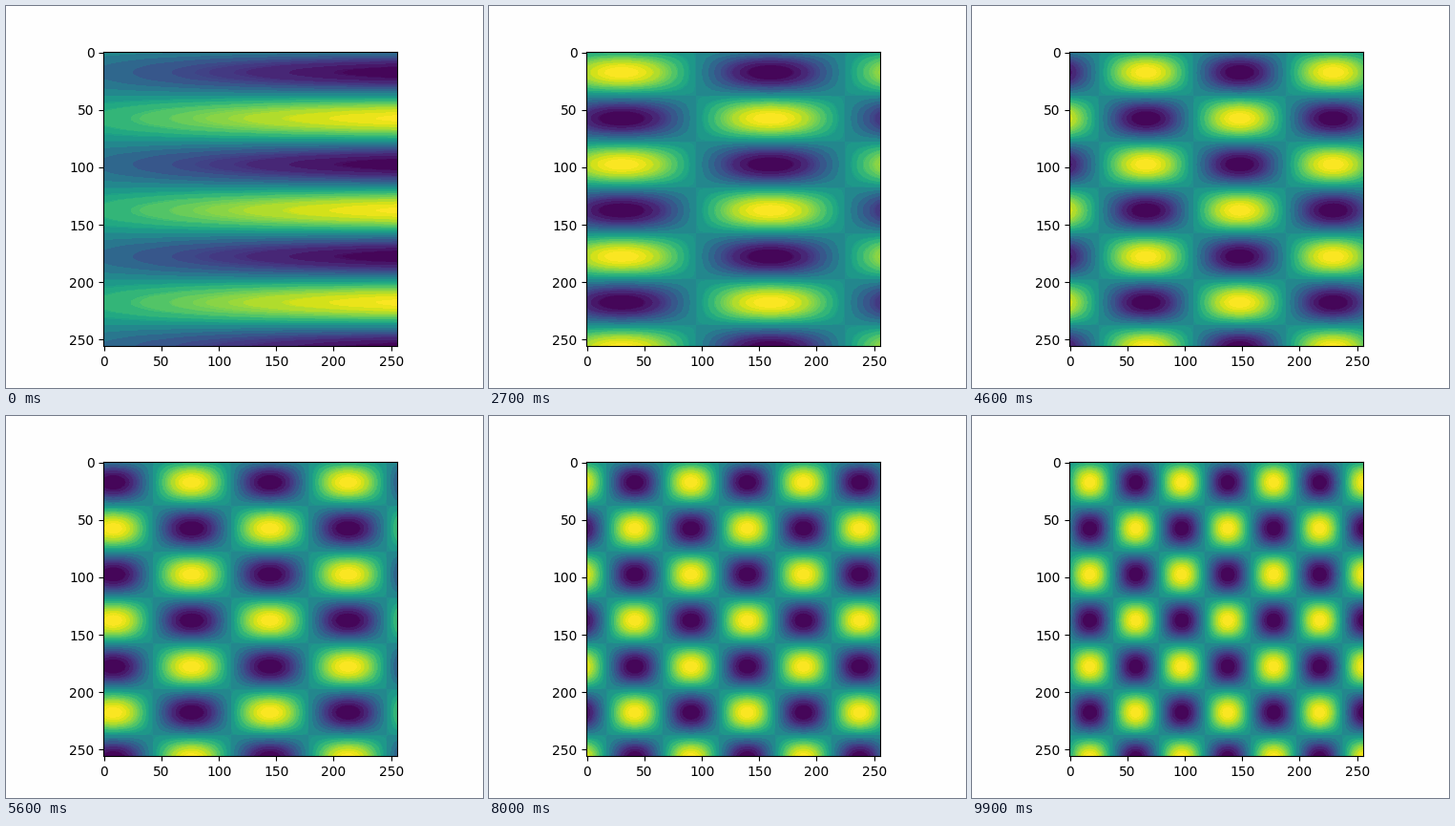
Write a matplotlib script that moves like this. It is 500 by 400 pixels and loops after 10000 ms.

```python
import matplotlib.pyplot as plt
import numpy as np
from matplotlib.animation import FuncAnimation
from matplotlib.colors import ListedColormap

FRAMES = 100
SIZE = 256
PAPER = "#fefefe"


def banded(name):
    """Flatten a colormap into bands of nearby colours (3-4-3 bit RGB cells)."""
    rgb = plt.get_cmap(name)(np.arange(256), bytes=True)[:, :3].astype(int)
    cells = rgb // [32, 16, 32]
    _, band = np.unique(cells, axis=0, return_inverse=True)
    band = band.ravel()
    means = np.array([rgb[band == b].mean(axis=0) for b in range(band.max() + 1)])
    return ListedColormap(np.floor(means[band]) / 255)


def wave(t):
    return np.sin(t + np.pi / 4)


axis = np.linspace(-10, 10, SIZE)
freqs = np.linspace(0.05, 1, FRAMES)


def field(i):
    return np.outer(wave(axis), wave(freqs[i] * axis))


fig, ax = plt.subplots(figsize=(5, 4), dpi=100, facecolor=PAPER)
im = ax.imshow(field(0), cmap=banded("viridis"))


def update(i):
    im.set_data(field(i))
    return [im]


anim = FuncAnimation(fig, update, frames=FRAMES, interval=100,
                     repeat=True, repeat_delay=0)
plt.show()
```
